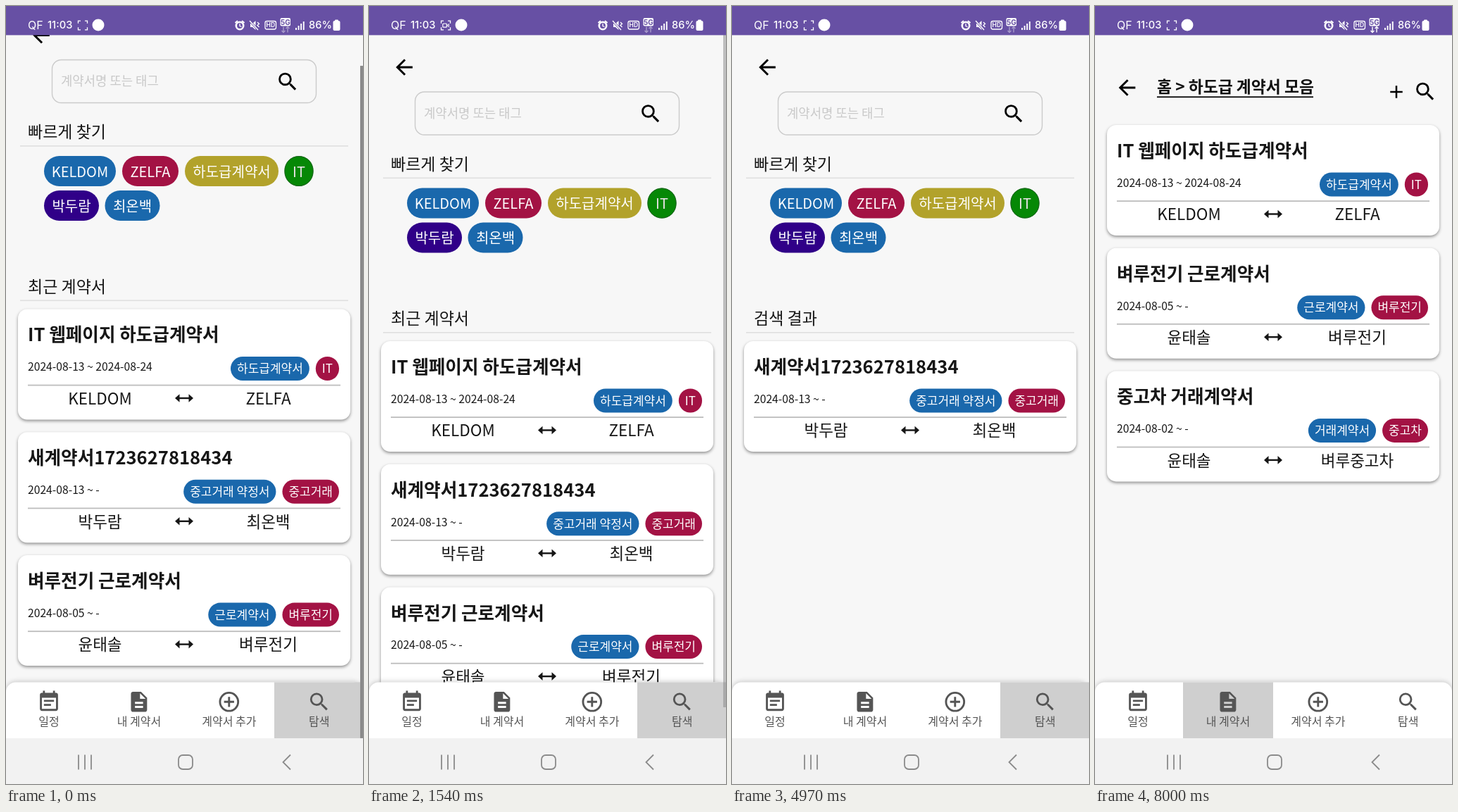
An HTML page with a canvas that plays this animation: 507 px wide and 1105 px high, repeating every 8.26 s.

```html
<!DOCTYPE html>
<html lang="ko">
<head>
<meta charset="utf-8">
<title>계약서 탐색</title>
<style>
html, body { margin: 0; width: 100%; height: 100%; overflow: hidden; background: #f7f7f7; }
canvas { display: block; width: 507px; height: 1105px; }
</style>
</head>
<body>
<canvas id="stage" width="507" height="1105"></canvas>
<script>
const LOOP = 8260, W = 507, TOP = 41, VIEW = 999;
const KR = '"Noto Sans CJK KR", "Noto Sans KR", "Noto Sans CJK JP", "Noto Sans", sans-serif';
const UI = 'Inter, Roboto, sans-serif';
const BLUE = '#1a68ac', RED = '#a31244', INK = '#161616', GREY = '#555';

const stage = document.getElementById('stage').getContext('2d');
const pageCanvas = document.createElement('canvas');
pageCanvas.width = W;
pageCanvas.height = VIEW;
const page = pageCanvas.getContext('2d');
let g = page;

const ICONS = {
  back: 'M20 11H7.83l5.59-5.59L12 4l-8 8 8 8 1.41-1.41L7.83 13H20v-2z',
  search: 'M15.5 14h-.79l-.28-.27A6.47 6.47 0 0 0 16 9.5 6.5 6.5 0 1 0 9.5 16c1.61 0 3.09-.59 4.23-1.57l.27.28v.79l5 4.99L20.49 19l-4.99-5zm-6 0C7.01 14 5 11.99 5 9.5S7.01 5 9.5 5 14 7.01 14 9.5 11.99 14 9.5 14z',
  plus: 'M19 13h-6v6h-2v-6H5v-2h6V5h2v6h6v2z',
  event: 'M17 10H7v2h10v-2zm2-7h-1V1h-2v2H8V1H6v2H5c-1.11 0-2 .9-2 2v14c0 1.1.89 2 2 2h14c1.1 0 2-.9 2-2V5c0-1.1-.9-2-2-2zm0 16H5V8h14v11zm-5-5H7v2h7v-2z',
  doc: 'M14 2H6c-1.1 0-2 .9-2 2v16c0 1.1.89 2 2 2h12c1.1 0 2-.9 2-2V8l-6-6zm2 16H8v-2h8v2zm0-4H8v-2h8v2zm-3-5V3.5L18.5 9H13z',
  add: 'M13 7h-2v4H7v2h4v4h2v-4h4v-2h-4V7zm-1-5a10 10 0 1 0 0 20 10 10 0 0 0 0-20zm0 18a8 8 0 1 1 0-16 8 8 0 0 1 0 16z'
};
for (const name in ICONS) ICONS[name] = new Path2D(ICONS[name]);

const CARDS = {
  web: { title: 'IT 웹페이지 하도급계약서', date: '2024-08-13 ~ 2024-08-24', tags: ['하도급계약서', 'IT'], from: 'KELDOM', to: 'ZELFA' },
  used: { title: '새계약서1723627818434', date: '2024-08-13 ~ -', tags: ['중고거래 약정서', '중고거래'], from: '박두람', to: '최온백' },
  work: { title: '벼루전기 근로계약서', date: '2024-08-05 ~ -', tags: ['근로계약서', '벼루전기'], from: '윤태솔', to: '벼루전기' },
  car: { title: '중고차 거래계약서', date: '2024-08-02 ~ -', tags: ['거래계약서', '중고차'], from: '윤태솔', to: '벼루중고차' }
};

const QUICK = [
  [54, 258.5, 102, 'KELDOM', BLUE], [165, 258.5, 80, 'ZELFA', RED],
  [254, 258.5, 133, '하도급계약서', '#b2a22b'], [395.5, 258.5, 41, 'IT', '#068806'],
  [54, 307.5, 78, '박두람', '#300088'], [140.5, 307.5, 78, '최온백', BLUE]
];

const TABS = [['event', '일정'], ['doc', '내 계약서'], ['add', '계약서 추가'], ['search', '탐색']];

// start, end, x, y of each tap
const TAPS = [[3010, 3250, 105, 283], [4300, 4440, 92, 331], [5960, 6110, 320, 283], [6990, 7180, 189, 1000]];

// times at which the recording mark turns on and off
const BLINKS = [400, 920, 1470, 1950, 2410, 2950, 3440, 3970, 4430, 4970, 5400, 5900, 6440, 6980, 7470, 8000];

const ramp = (t, a, b) => Math.min(1, Math.max(0, (t - a) / (b - a)));
const easeOut = p => 1 - (1 - p) ** 2;
const easeInOut = p => p * p * (3 - 2 * p);

function text(s, x, cy, size, color = INK, align = 'left', weight = 400, family = KR) {
  g.font = `${weight} ${size}px ${family}`;
  g.textAlign = align;
  g.fillStyle = color;
  g.fillText(s, x, cy + size * 0.37);
}

function fillRound(x, y, w, h, r, color) {
  g.beginPath();
  g.roundRect(x, y, w, h, r);
  g.fillStyle = color;
  g.fill();
}

function strokeRound(x, y, w, h, r, color, width) {
  g.beginPath();
  g.roundRect(x, y, w, h, r);
  g.strokeStyle = color;
  g.lineWidth = width;
  g.stroke();
}

function rect(x, y, w, h, color) {
  g.fillStyle = color;
  g.fillRect(x, y, w, h);
}

function line(points, color, width) {
  g.beginPath();
  points.forEach(([x, y]) => g.lineTo(x, y));
  g.strokeStyle = color;
  g.lineWidth = width;
  g.stroke();
}

function ring(x, y, r, color, width) {
  g.beginPath();
  g.arc(x, y, r, 0, Math.PI * 2);
  g.strokeStyle = color;
  g.lineWidth = width;
  g.stroke();
}

function icon(name, cx, cy, scale = 1.43, color = '#000') {
  g.save();
  g.translate(cx - 12 * scale, cy - 12 * scale);
  g.scale(scale, scale);
  g.fillStyle = color;
  g.fill(ICONS[name]);
  g.restore();
}

function shaded(blur, dy, alpha, draw) {
  g.save();
  g.shadowColor = `rgba(0,0,0,${alpha})`;
  g.shadowBlur = blur;
  g.shadowOffsetY = dy;
  draw();
  g.restore();
}

function swapArrow(cx, cy) {
  rect(cx - 8, cy - 1.2, 16, 2.4, INK);
  for (const side of [-1, 1]) {
    g.beginPath();
    g.moveTo(cx + side * 13, cy);
    g.lineTo(cx + side * 6.5, cy - 5.8);
    g.lineTo(cx + side * 6.5, cy + 5.8);
    g.fill();
  }
}

function card(c, y) {
  shaded(4, 2, 0.42, () => fillRound(17, y, 472, 157, 13, '#fff'));
  text(c.title, 31, y + 36.5, 25.6, INK, 'left', 700);
  text(c.date, 31, y + 82, 15.7);
  let right = 473;
  for (const i of [1, 0]) {
    g.font = `400 17px ${KR}`;
    const w = g.measureText(c.tags[i]).width + 18;
    fillRound(right - w, y + 67.5, w, 34, 17, i ? RED : BLUE);
    text(c.tags[i], right - w / 2, y + 84.5, 17, '#fff', 'center');
    right -= w + 9;
  }
  rect(31, y + 107.2, 444, 1.8, '#bdbdbd');
  text(c.from, 133.5, y + 127, 22.5, INK, 'center');
  swapArrow(253, y + 126.5);
  text(c.to, 372.5, y + 127, 22.5, INK, 'center');
}

function heading(s, cy) {
  text(s, 31, cy, 23);
  rect(20, cy + 19.5, 466, 1.6, '#dfdfdf');
}

function searchPage(title, cards) {
  icon('back', 50, 87, 1.48);
  strokeRound(65.5, 122, 375, 61, 13, '#cbcbcb', 1.4);
  text('계약서명 또는 태그', 78, 152, 17.8, '#c9c9c9');
  icon('search', 400, 153);
  heading('빠르게 찾기', 224);
  for (const [x, y, w, s, color] of QUICK) {
    const green = s === 'IT';
    fillRound(x, y, w, 43, 21.5, color);
    if (green) strokeRound(x + .5, y + .5, w - 1, 42, 21, '#1c5f20', 1);
    text(s, x + w / 2, y + 22.2, 20, green ? '#eee4ea' : '#fff', 'center');
  }
  heading(title, 443.5);
  cards.forEach((c, i) => card(CARDS[c], 476 + i * 174.8));
}

function folderPage() {
  icon('back', 45.5, 116, 1.48);
  text('홈 > 하도급 계약서 모음', 88, 115, 22.8, '#111', 'left', 700);
  rect(88, 128.3, 222, 1.9, '#111');
  icon('plus', 428, 122, 1.25);
  icon('search', 469, 121.5);
  ['web', 'work', 'car'].forEach((c, i) => card(CARDS[c], 169 + i * 174.7));
}

function tabBar(active) {
  shaded(7, -1, 0.2, () => fillRound(0, 960.5, W, 100, [14, 14, 0, 0], '#fff'));
  rect(-3 + 128 * active, 960.5, 128, 90, '#cfcfcf');
  TABS.forEach(([name, label], i) => {
    const x = 61 + i * 127.9;
    icon(name, x, 988.3, 1.43, GREY);
    text(label, x, 1016.5, 16, GREY, 'center');
  });
}

function drawPage(t) {
  g = page;
  g.setTransform(1, 0, 0, 1, 0, -TOP);
  rect(0, TOP, W, VIEW, '#f7f7f7');
  const scroll = 45.5 * (1 - easeOut(ramp(t, 920, 1110)));
  const folder = t >= 7260;
  g.save();
  g.translate(0, -scroll);
  if (folder) folderPage();
  else if (t < 3300) searchPage('최근 계약서', ['web', 'used', 'work']);
  else searchPage('검색 결과', [t >= 4500 && t < 6110 ? 'used' : 'web']);
  g.restore();
  tabBar(folder ? 1 : 3);

  const bar = t < 900 ? 1 - ramp(t, 310, 650) : ramp(t, 900, 930) * (1 - ramp(t, 1400, 1690));
  if (bar > 0) {
    g.globalAlpha = bar;
    rect(503, TOP + scroll * 0.965, 4, 955, '#8a8a8a');
    g.globalAlpha = 1;
  }
}

// Elastic overscroll: rows move down by a quadratic amount.
function showPage(t) {
  const k = t < 1250 ? easeOut(ramp(t, 1080, 1210)) : 1 - easeInOut(ramp(t, 1260, 1530));
  if (k === 0) {
    g.drawImage(pageCanvas, 0, TOP);
    return;
  }
  const rowAt = v => {
    let u = v;
    for (let i = 0; i < 4; i++) u = v - k * (0.0311 * u - 0.00001553 * u * u);
    return u;
  };
  for (let v = 0; v < VIEW; v += 9) {
    const a = rowAt(v), b = rowAt(v + 9);
    g.drawImage(pageCanvas, 0, a, W, b - a, 0, TOP + v, W, 9);
  }
}

function captureMark(on) {
  for (const sx of [-1, 1]) for (const sy of [-1, 1]) {
    const x = 109 + sx * 6.5, y = 27.5 + sy * 6.3;
    line([[x - sx * 3.5, y], [x, y], [x, y - sy * 3.5]], '#fff', 1.3);
  }
  if (!on) return;
  strokeRound(104.8, 25, 5.6, 5.2, 1, '#fff', 1.2);
  line([[111, 27.6], [113.3, 25.6], [113.3, 29.6], [111, 27.6]], '#fff', 1);
}

function netArrow(x, dir, color) {
  line([[x, 33.5 - dir * 4], [x, 33.5 + dir * 4]], color, 1.4);
  line([[x - 2.5, 33.5 + dir * 1.5], [x, 33.5 + dir * 4], [x + 2.5, 33.5 + dir * 1.5]], color, 1.4);
}

function statusBar(t) {
  const white = '#fff', purple = '#6750a4';
  rect(0, 0, W, TOP + .4, purple);
  text('QF', 31, 27, 16, white, 'left', 400, UI);
  text('11:03', 59, 27, 14.7, white, 'left', 500, UI);
  captureMark(BLINKS.filter(b => b <= t).length % 2 === 1);
  fillRound(122.5, 18.5, 17, 17, 8.5, white);

  // alarm
  ring(332, 28, 5.2, white, 2.6);
  line([[332, 25], [332, 28.5], [334.5, 29.5]], white, 1.3);
  line([[325.5, 24], [329, 21]], white, 2);
  line([[335, 21], [338.5, 24]], white, 2);

  // muted speaker
  g.fillStyle = white;
  g.beginPath();
  [[347, 25], [350, 25], [354.5, 21], [354.5, 34], [350, 30], [347, 30]].forEach(([x, y]) => g.lineTo(x, y));
  g.fill();
  line([[346, 21], [358, 34]], purple, 3);
  line([[346, 21], [358, 34]], white, 1.4);
  line([[357, 23], [359.5, 25.3], [357, 27.5], [359.5, 30]], white, 1.3);

  strokeRound(368, 21.5, 15.5, 11.5, 2.5, white, 1.3);
  text('HD', 375.8, 27.3, 8.5, white, 'center', 600, UI);

  fillRound(389.5, 17, 14.5, 11.5, 2, white);
  text('5G', 396.8, 22.8, 10, purple, 'center', 700, UI);
  const busy = t >= 920 && t < 1500 || t >= 5400;
  const tone = busy ? white : '#a99ccb';
  netArrow(394, 1, tone);
  netArrow(400, -1, tone);

  for (let i = 0; i < 4; i++) rect(411 + i * 3.6, 31 - i * 3, 1.9, 3 + i * 3, white);
  text('86%', 430, 27, 14.6, white, 'left', 500, UI);
  fillRound(467, 19.5, 5, 3, 1, white);
  fillRound(464.5, 21, 10, 14, 2, white);
}

function systemBar() {
  const grey = '#8b8b8b';
  rect(0, 1040, W, 65, '#f2f2f2');
  for (const x of [103, 112, 121]) rect(x - .9, 1063.5, 1.8, 21, grey);
  strokeRound(245, 1064, 20, 20, 6, grey, 1.8);
  line([[404, 1063.5], [393.5, 1074], [404, 1084.5]], grey, 1.8);
}

function touches(t) {
  const color = '#a9c1e2';
  if (t >= 920 && t < 1265) ring(419.7, 430 + 105 * ramp(t, 920, 1200), 12.3, color, 1.4);
  for (const [a, b, x, y] of TAPS) if (t >= a && t < b) ring(x, y, 12.3, color, 1.4);
}

let start;
function frame(now) {
  start ??= now;
  const t = (now - start) % LOOP;
  drawPage(t);
  g = stage;
  showPage(t);
  statusBar(t);
  systemBar();
  touches(t);
  requestAnimationFrame(frame);
}
requestAnimationFrame(frame);
</script>
</body>
</html>
```
